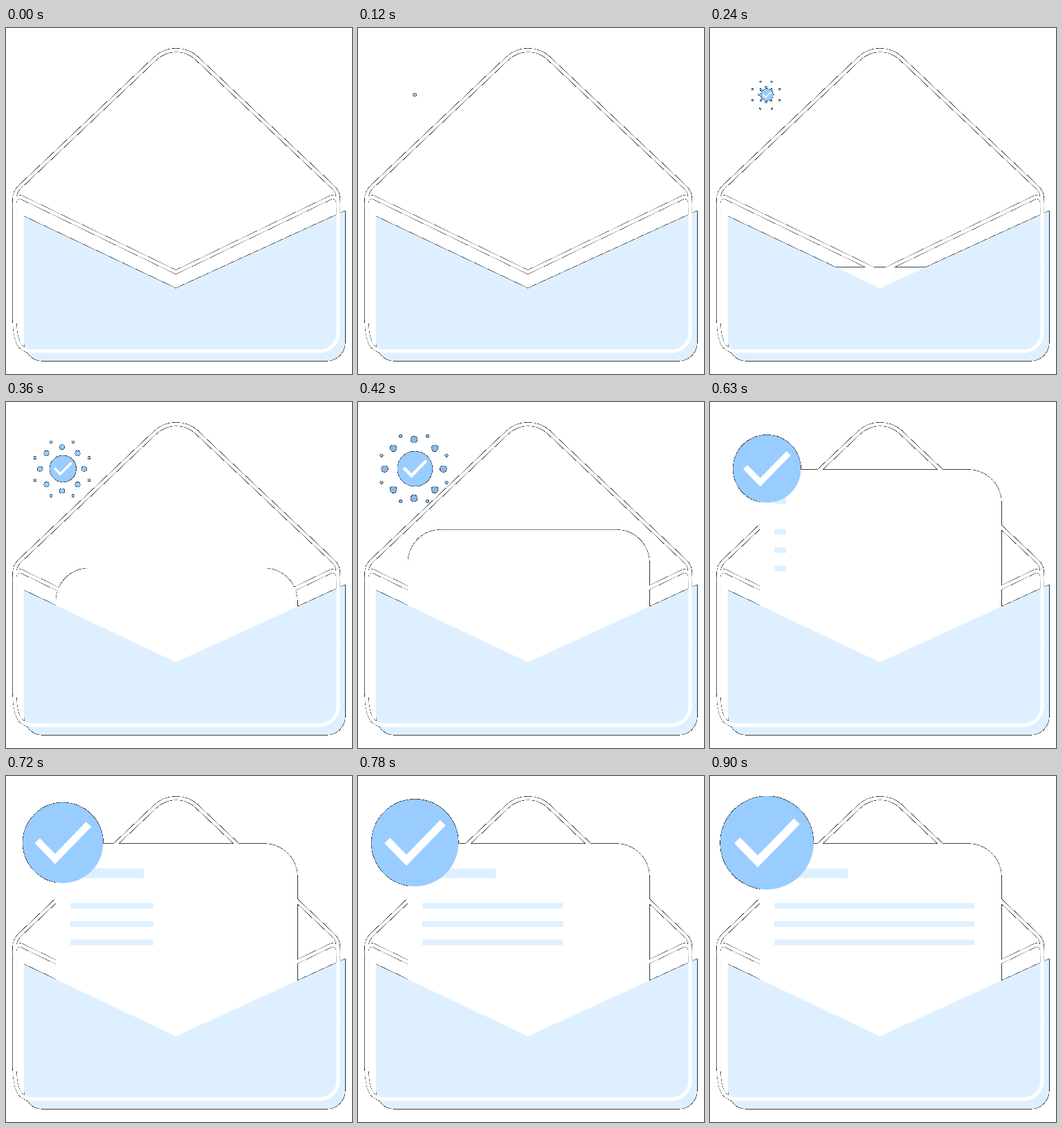
Write an HTML page with a canvas that moves like this. It is 500 px wide and 500 px high and loops after 1.38 s.

```html
<!DOCTYPE html>
<html lang="en">
<head>
<meta charset="utf-8">
<title>Envelope</title>
<style>
html, body { margin: 0; width: 100%; height: 100%; overflow: hidden; background: #fff; }
canvas { display: block; width: 500px; height: 500px; }
</style>
</head>
<body>
<canvas id="stage" width="500" height="500"></canvas>
<script>
const SIZE = 500, LOOP = 1380, STEP = 30, END = 900;
const PALE = '#def0ff', BLUE = '#99ccff', WHITE = '#fff';
const CUTOFF = 10;

const out = document.getElementById('stage').getContext('2d');
const layer = document.createElement('canvas');
layer.width = layer.height = SIZE;
const ctx = layer.getContext('2d', { willReadFrequently: true });

const clamp = v => Math.max(0, Math.min(1, v));
const smooth = u => u * u * (3 - 2 * u);

// Cubic bezier easing with flat ends: handles at (x1, 0) and (x2, 1).
function ease(u, x1, x2) {
  let lo = 0, hi = 1;
  for (let i = 0; i < 20; i++) {
    const s = (lo + hi) / 2, r = 1 - s;
    if (3 * r * r * s * x1 + 3 * r * s * s * x2 + s * s * s < u) lo = s; else hi = s;
  }
  return smooth(lo);
}

function disc(x, y, r, color) {
  ctx.fillStyle = color;
  ctx.beginPath();
  ctx.arc(x, y, r, 0, Math.PI * 2);
  ctx.fill();
}

function line(path, width) {
  ctx.strokeStyle = WHITE;
  ctx.lineWidth = width;
  ctx.stroke(path);
}

const flap = new Path2D();
flap.moveTo(12.3, 260);
flap.arcTo(12.3, 236.8, 159.8, 97, 24);
flap.arcTo(245.9, 15.4, 332, 97, 44);
flap.arcTo(480, 236.8, 480, 260, 24);
flap.lineTo(480, 260);

const pocket = new Path2D();
pocket.moveTo(245.5, 352.8);
pocket.lineTo(24, 245.4);
pocket.bezierCurveTo(18, 242.5, 12.3, 246, 12.3, 254);
pocket.lineTo(12.3, 420);
pocket.bezierCurveTo(12.9, 456, 20, 467, 40, 467);
pocket.arcTo(480, 467, 480, 440, 27);
pocket.lineTo(480, 254);
pocket.bezierCurveTo(480, 246, 474, 242.5, 468, 245.4);
pocket.closePath();

const front = new Path2D();
front.moveTo(26, 272);
front.lineTo(245.5, 376);
front.lineTo(490.2, 264);
front.arcTo(490.2, 481.2, 460, 481.2, 27);
front.arcTo(26, 481.2, 26, 450, 27);
front.closePath();

const tick = new Path2D();
tick.moveTo(-43, -3.5);
tick.lineTo(-13.3, 27);
tick.lineTo(43.2, -31);

function drawPaper(t) {
  const top = 97.8 + 416.6 * (1 - clamp(t / 510) ** 1.2);
  if (top > 400) return;
  ctx.fillStyle = WHITE;
  ctx.beginPath();
  ctx.roundRect(72, top, 349.2, 450 - top, [48, 48, 0, 0]);
  ctx.fill();
}

function drawText(t) {
  const w = 289 * smooth(clamp((t - 585) / 305));
  ctx.fillStyle = PALE;
  ctx.fillRect(93, 133.5, Math.min(w, 106), 14);
  for (const y of [183.5, 210, 236.5]) ctx.fillRect(93, y, w, 8);
}

function drawDots(t) {
  const age = t - 178, alpha = clamp((555 - t) / 150);
  if (age <= 0 || alpha <= 0) return;
  const s = t - 240, far = 21 + 0.1926 * s - 0.000147 * s * s;
  ctx.globalAlpha = alpha;
  for (let i = 0; i < 16; i++) {
    const a = i * Math.PI / 8;
    const dist = i % 2 ? far : age * 0.175;
    const r = i % 2 ? 0.5 + far * 0.032 : age * 0.0196;
    disc(81 + dist * Math.cos(a), 96.7 + dist * Math.sin(a), r, BLUE);
  }
  ctx.globalAlpha = 1;
}

function drawBadge(t) {
  const k = ease(clamp(t / END), 0.41, 0.726);
  if (k <= 0) return;
  ctx.save();
  ctx.translate(82.3, 96.5);
  ctx.scale(k, k);
  disc(0, 0, 67.5, BLUE);
  line(tick, 12);
  ctx.restore();
}

// Soft edges are flattened onto black, empty pixels become white.
function flatten() {
  const img = ctx.getImageData(0, 0, SIZE, SIZE), d = img.data;
  for (let i = 0; i < d.length; i += 4) {
    const a = d[i + 3];
    for (let c = i; c < i + 3; c++) d[c] = a < CUTOFF ? 255 : d[c] * a / 255;
    d[i + 3] = 255;
  }
  out.putImageData(img, 0, 0);
}

function draw(t) {
  ctx.clearRect(0, 0, SIZE, SIZE);
  line(flap, 5);
  line(pocket, 5);
  drawPaper(t);
  ctx.fillStyle = PALE;
  ctx.fill(front);
  line(pocket, 5);
  drawText(t);
  drawDots(t);
  drawBadge(t);
  flatten();
}

let start = null, shown = -1;
function tickFrame(now) {
  if (start === null) start = now;
  const t = Math.min(END, Math.floor(((now - start) % LOOP) / STEP) * STEP);
  if (t !== shown) draw(shown = t);
  requestAnimationFrame(tickFrame);
}
requestAnimationFrame(tickFrame);
</script>
</body>
</html>
```
